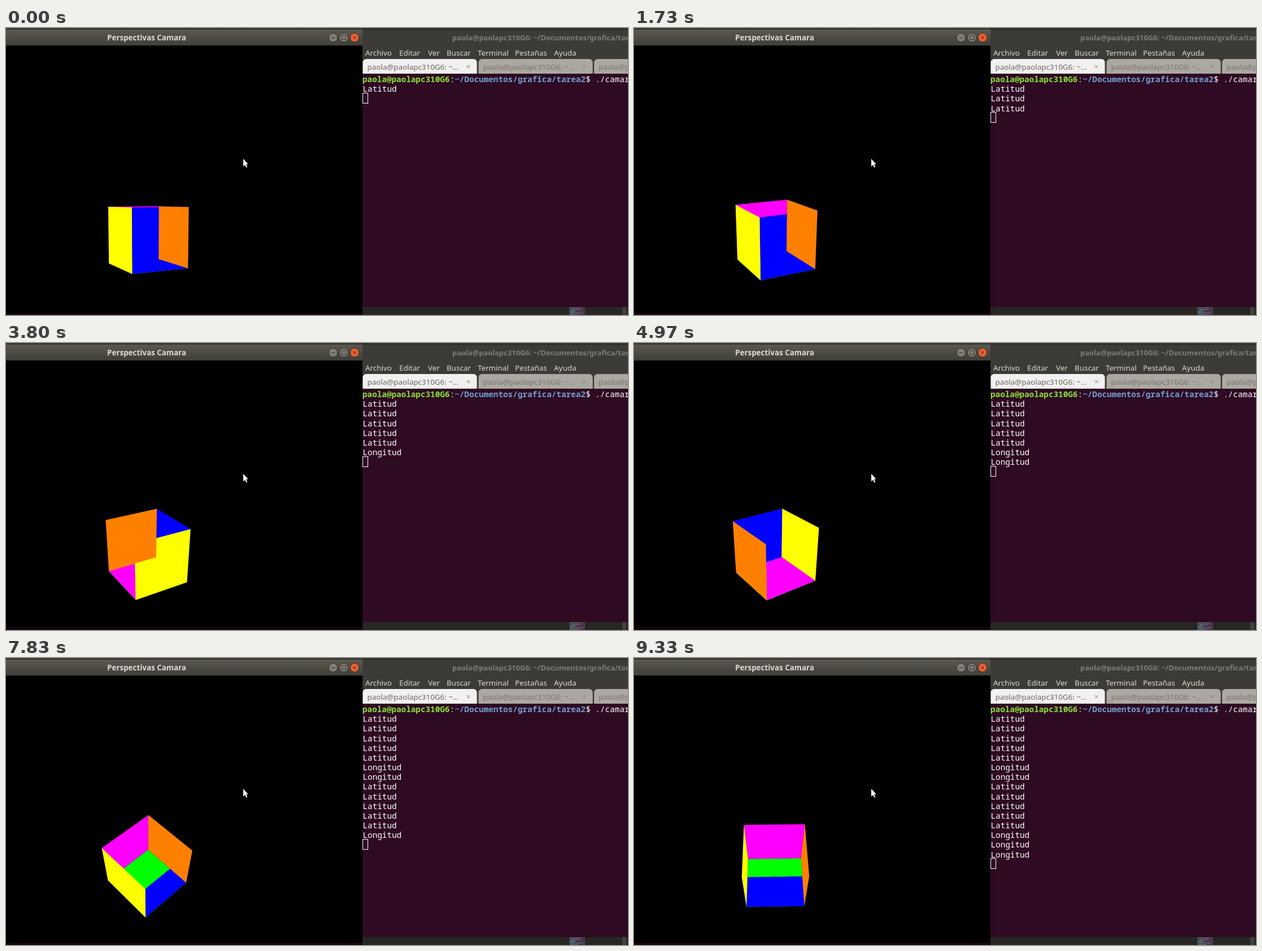
Animation, 1101 px wide and 509 px high, one loop 9360 ms. Source, as an HTML page with a canvas:

```html
<!DOCTYPE html>
<html lang="es">
<head>
<meta charset="utf-8">
<title>Perspectivas Camara</title>
<style>
html, body { margin: 0; width: 100%; height: 100%; overflow: hidden; background: #000; }
canvas { display: block; }
</style>
</head>
<body>
<canvas id="stage" width="1101" height="509"></canvas>
<script>
const ctx = document.getElementById('stage').getContext('2d');
const LOOP = 9360;
const SANS = '"Noto Sans", "Open Sans", sans-serif';
const MONO = '14.3px "Noto Sans Mono", "DejaVu Sans Mono", monospace';
const USER = 'paola@paolapc310G6';

// Key presses: each one adds a line to the terminal and moves the camera.
const START_LON = -0.32;
const LAT_STEP = 0.1;
const latPresses = [0, 1150, 1700, 2250, 2800, 5150, 5450, 5750, 6050, 6350];
const lonPresses = [[3400, 1.317], [4100, 2.957], [7390, -0.034], [8200, -0.4], [8750, -0.768]];
const presses = [
  ...latPresses.map(time => ({ time, word: 'Latitud' })),
  ...lonPresses.map(([time, lon]) => ({ time, word: 'Longitud', lon }))
].sort((a, b) => a.time - b.time);

// Open box with half side 1, painted in this order without a depth test.
const FOCAL = 603.5, DIST = 11.49, CX = 249.5, CY = 369.9;
const walls = [['#f0f', 2, 3], ['#00f', 0, 1], ['#ff0', 3, 0], ['#ff8000', 1, 2]];

function rect(x, y, w, h, fill) {
  ctx.fillStyle = fill;
  ctx.fillRect(x, y, w, h);
}

function text(str, x, y, font, fill, align = 'left') {
  ctx.font = font;
  ctx.fillStyle = fill;
  ctx.textAlign = align;
  ctx.fillText(str, x, y);
}

function poly(points, fill) {
  ctx.beginPath();
  points.forEach(([x, y]) => ctx.lineTo(x, y));
  ctx.closePath();
  ctx.fillStyle = fill;
  ctx.fill();
}

function line(color, ...points) {
  ctx.beginPath();
  points.forEach(([x, y], i) => i % 2 ? ctx.lineTo(x, y) : ctx.moveTo(x, y));
  ctx.strokeStyle = color;
  ctx.lineWidth = 1;
  ctx.stroke();
}

function gradient(top, bottom, from, to) {
  const g = ctx.createLinearGradient(0, top, 0, bottom);
  g.addColorStop(0, from);
  g.addColorStop(1, to);
  return g;
}

function drawBox(lat, lon) {
  const c = Math.cos(lat), s = Math.sin(lat);
  const corner = (i, h) => {
    const angle = lon + i * Math.PI / 2;
    const x = Math.SQRT2 * Math.sin(angle), z = Math.SQRT2 * Math.cos(angle);
    const k = FOCAL / (DIST - z * c - h * s);
    return [CX + x * k, CY - (h * c - z * s) * k];
  };
  poly([0, 1, 2, 3].map(i => corner(i, -1)), '#0f0');
  for (const [color, a, b] of walls)
    poly([corner(a, 1), corner(b, 1), corner(b, -1), corner(a, -1)], color);
}

function button(x, fill) {
  ctx.beginPath();
  ctx.arc(x, 17, 7.7, 0, 7);
  ctx.fillStyle = fill;
  ctx.fill();
  ctx.strokeStyle = '#34322d';
  ctx.lineWidth = 1;
  ctx.stroke();
}

function drawViewer(lat, lon) {
  rect(0, 0, 631, 31, '#393833');
  rect(0, 3, 631, 28, gradient(3, 31, '#5b584f', '#3f3e39'));
  text('Perspectivas Camara', 249, 22, 'bold 13.4px ' + SANS, '#dfdbd2', 'center');
  button(579, '#817e75');
  button(598, '#817e75');
  button(617, '#ee6030');
  line('#34322d', [575.5, 17.5], [582.5, 17.5]);
  ctx.strokeRect(594.5, 13.5, 7, 7);
  line('#40201a', [614.5, 14.5], [619.5, 19.5], [619.5, 14.5], [614.5, 19.5]);

  rect(0, 31, 631, 474, '#000');
  rect(0, 505, 631, 4, '#16060f');
  drawBox(lat, lon);

  poly([[420, 232], [420, 245.5], [423, 242.7], [425.2, 247.4], [427.2, 246.5], [425, 241.8], [428.6, 241.4]], '#fff');
}

function tab(x, fill, color, label, close) {
  ctx.beginPath();
  ctx.roundRect(x, 55, 202, 26, [6, 6, 0, 0]);
  ctx.fillStyle = fill;
  ctx.fill();
  text(label, x + 8, 74, '13.4px ' + SANS, color);
  if (close) {
    const cx = x + 187;
    line(color, [cx - 2.5, 66], [cx + 2.5, 71], [cx + 2.5, 66], [cx - 2.5, 71]);
  }
}

function drawTerminal(lines) {
  rect(631, 0, 470, 81, '#3c3b37');
  rect(631, 0, 470, 4, '#33322e');
  text(USER + ': ~/Documentos/grafica/tarea2', 790, 22, 'bold 12.9px ' + SANS, '#807d76');
  const menu = [['Archivo', 636], ['Editar', 696], ['Ver', 747], ['Buscar', 780],
    ['Terminal', 835], ['Pestañas', 901], ['Ayuda', 970]];
  for (const [label, x] of menu) text(label, x, 48.5, '13.4px ' + SANS, '#dfdbd2');

  tab(631.5, '#f2f1f0', '#696761', USER + ': ~...', true);
  tab(836.5, '#aba8a1', '#77746e', USER + ': ~...', true);
  tab(1041, '#aba8a1', '#77746e', USER, false);

  rect(631, 81, 470, 414, '#2c001e');
  rect(631, 81, 470, 414, 'rgba(48, 20, 40, .5)');
  const advance = 8.59;
  text(USER, 631, 96, 'bold ' + MONO, '#8ae234');
  text(':', 631 + 18 * advance, 96, MONO, '#fff');
  text('~/Documentos/grafica/tarea2', 631 + 19 * advance, 96, 'bold ' + MONO, '#729fcf');
  text('$ ./camara', 631 + 46 * advance, 96, MONO, '#fff');
  lines.forEach((p, i) => text(p.word, 631.5, 113.2 + 17.17 * i, MONO, '#fff'));
  ctx.strokeStyle = '#fff';
  ctx.lineWidth = 1;
  ctx.strokeRect(631.5, Math.round(98.6 + 17.17 * lines.length) - 0.5, 9, 18);

  rect(631, 495, 470, 14, '#272622');
  rect(997, 495, 28, 14, '#48384b');
  for (let i = 0; i < 5; i++) rect(998 + i % 2 * 3, 496 + i * 3, 20 - i % 3 * 5, 1, '#78747d');
  rect(998, 500, 9, 7, '#426564');
  rect(1091, 495, 7, 14, '#42413e');
}

function frame(now) {
  const t = now % LOOP;
  const done = presses.filter(p => p.time <= t);
  const turns = done.filter(p => p.lon !== undefined);
  const lat = LAT_STEP * (done.length - turns.length);
  const lon = turns.length ? turns[turns.length - 1].lon : START_LON;
  drawTerminal(done);
  drawViewer(lat, lon);
  requestAnimationFrame(tick);
}

let start;
function tick(now) {
  start ??= now;
  frame(now - start);
}
requestAnimationFrame(tick);
</script>
</body>
</html>
```
